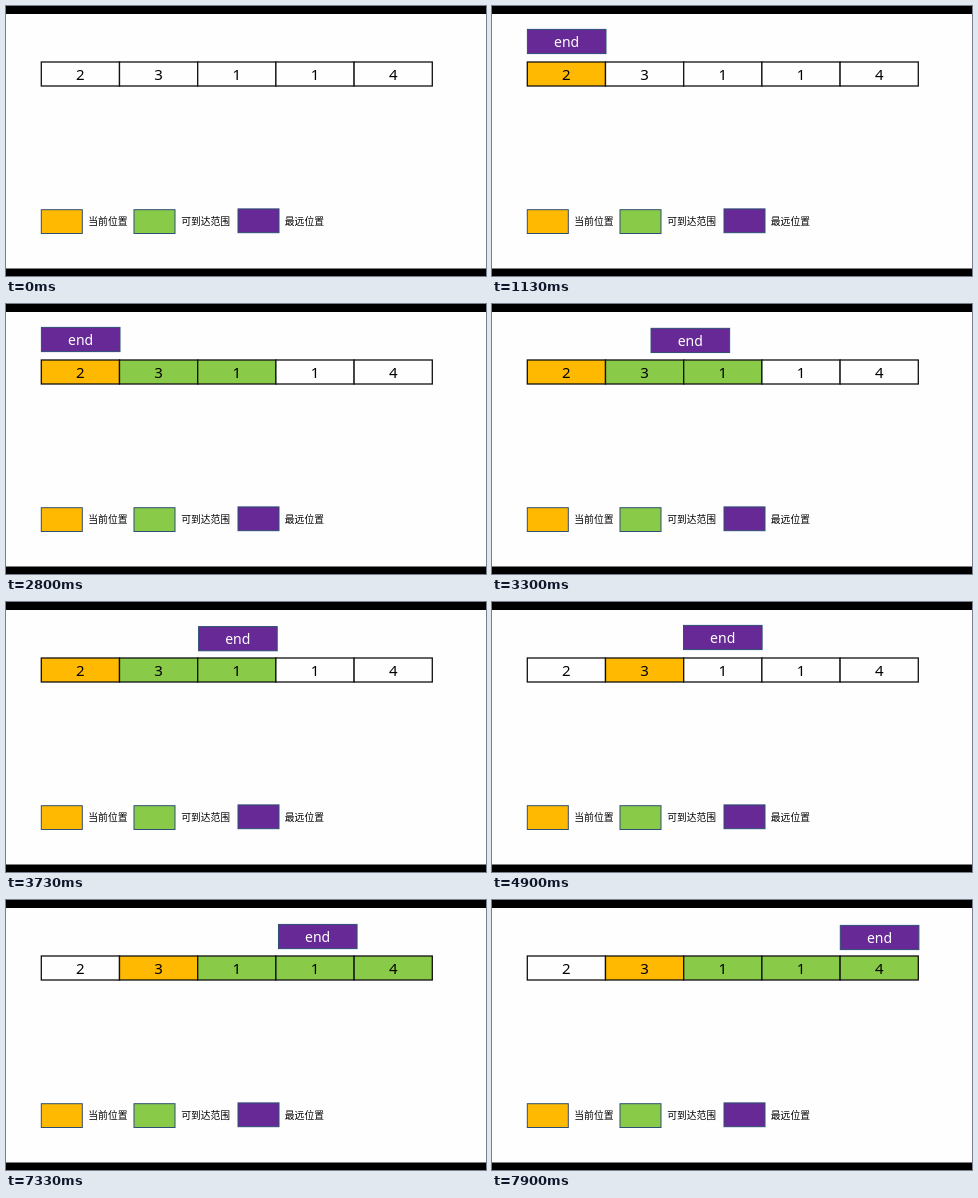
An HTML page that plays this animation: 480 px wide and 270 px high, repeating every 8 s.

```html
<!DOCTYPE html>
<html lang="zh-CN">
<head>
<meta charset="utf-8">
<style>
  html, body { margin: 0; width: 100%; height: 100%; overflow: hidden; background: #fefefe; }
  svg { display: block; width: 480px; height: 270px; }
  text { font-family: "Noto Sans", "Open Sans", sans-serif; font-size: 15px; }
  .label { font-family: "Noto Sans CJK SC", "Noto Sans CJK", sans-serif; font-size: 9.8px; font-weight: 500; }
  .mid { text-anchor: middle; }
  .cell { stroke: #111; stroke-width: 1.3; }
  .box { stroke: #2f4f75; stroke-width: 1; }
</style>
</head>
<body>
<svg id="stage" viewBox="0 0 480 270">
  <rect width="480" height="270" fill="#fefefe"/>
  <rect width="480" height="8"/>
  <rect y="262.5" width="480" height="7.5"/>
</svg>
<script>
const DURATION = 8000;
const WHITE = '#fefefe', ORANGE = '#ffb900', GREEN = '#89cb48', PURPLE = '#672996';
const COLORS = { w: WHITE, o: ORANGE, g: GREEN };
const CELL_W = 78.2, LEFT = 35.3;

// Start time and the colour of each cell
const fills = [
  [0, 'wwwww'], [500, 'owwww'], [1950, 'oggww'],
  [4200, 'wowww'], [5500, 'woggg']
];

// Start time, duration, position before and after
const moves = [
  [500, 0, [35.4, 23.4], [35.4, 23.4]],
  [2950, 500, [35.4, 23.4], [192.6, 24.6]],
  [4200, 0, [191.5, 23.4], [191.5, 23.4]],
  [7050, 550, [191.5, 23.4], [348.3, 25.4]]
];

const stage = document.getElementById('stage');

function add(tag, attrs, parent = stage, content = '') {
  const node = document.createElementNS(stage.namespaceURI, tag);
  for (const name in attrs) node.setAttribute(name, attrs[name]);
  node.textContent = content;
  return parent.appendChild(node);
}

const cells = [2, 3, 1, 1, 4].map((value, i) => {
  const x = LEFT + i * CELL_W;
  const rect = add('rect', { x, y: 56, width: CELL_W, height: 24, class: 'cell' });
  add('text', { x: x + CELL_W / 2, y: 74, class: 'mid' }, stage, value);
  return rect;
});

[
  [35.3, 203.7, ORANGE, 82.3, '当前位置'],
  [128, 203.7, GREEN, 175.2, '可到达范围'],
  [232, 202.9, PURPLE, 278.8, '最远位置']
].forEach(([x, y, fill, textX, name]) => {
  add('rect', { x, y, width: 41, height: 23.8, fill, class: 'box' });
  add('text', { x: textX, y: 219.2, class: 'label' }, stage, name);
});

const marker = add('g', {});
add('rect', { width: 78.6, height: 24.2, fill: PURPLE, class: 'box' }, marker);
add('text', { x: 39.2, y: 17.8, fill: '#fff', class: 'mid', style: 'font-size:14px' }, marker, 'end');

const ease = p => p * p * (3 - 2 * p);
const latest = (table, time) => table.filter(row => row[0] <= time).pop();

function draw(time) {
  const [, pattern] = latest(fills, time);
  cells.forEach((cell, i) => cell.setAttribute('fill', COLORS[pattern[i]]));

  const move = latest(moves, time);
  marker.setAttribute('visibility', move ? 'visible' : 'hidden');
  if (!move) return;
  const [start, length, from, to] = move;
  const p = length ? ease(Math.min(1, (time - start) / length)) : 1;
  const [x, y] = from.map((v, i) => v + (to[i] - v) * p);
  marker.setAttribute('transform', `translate(${x} ${y})`);
}

const began = performance.now();
function tick() {
  draw((performance.now() - began) % DURATION);
  requestAnimationFrame(tick);
}
tick();
</script>
</body>
</html>
```
